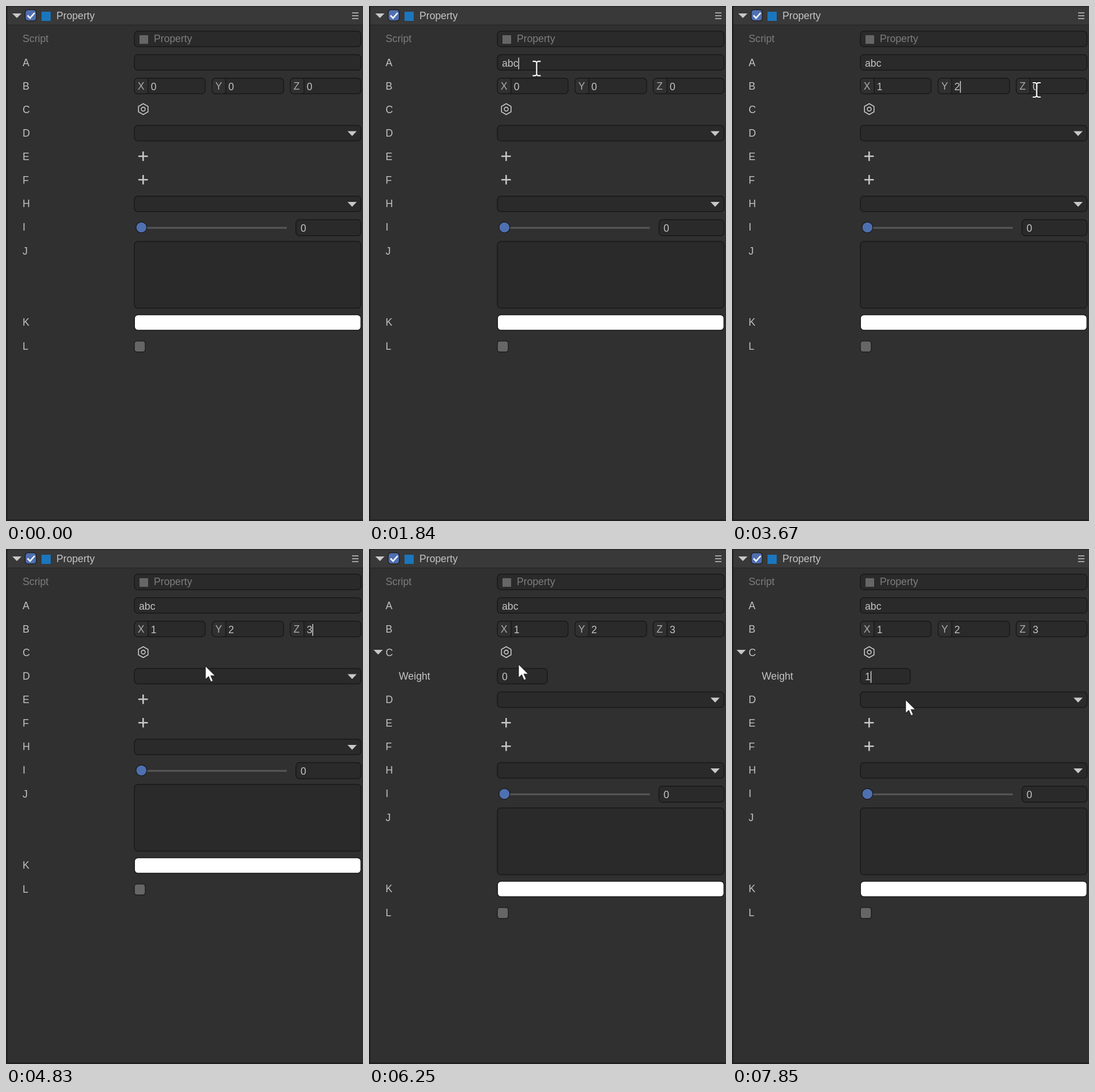
An HTML page that plays this animation: 623 px wide and 899 px high, repeating every 8 s.

```html
<!DOCTYPE html>
<html lang="en">
<head>
<meta charset="utf-8">
<title>Property panel</title>
<style>
html, body { margin: 0; width: 100%; height: 100%; overflow: hidden; background: #303030; }
svg { display: block; }
text { font: 17.7px "Liberation Sans", Arial, sans-serif; fill: #c4c4c4; white-space: pre; }
.dim { fill: #7d7d7d; }
.axis { fill: #aaa; }
.box { fill: #2a2a2a; stroke: #191919; stroke-width: 1.5; }
.icon { fill: #c8c8c8; }
.line { fill: none; stroke: #c8c8c8; }
#menu text { font: 17.7px "Noto Sans CJK SC", "Noto Sans CJK", sans-serif; fill: #111; }
#menu .off { fill: #777; }
</style>
</head>
<body>
<svg width="623" height="899" viewBox="0 0 623 899">
  <rect width="623" height="899" fill="#303030"/>
  <rect width="623" height="33" fill="#393939"/>
  <rect width="623" height="1.5" fill="#292929"/>
  <rect y="32.5" width="623" height="1.5" fill="#272727"/>
  <rect width="2.5" height="899" fill="#1e1e1e"/>
  <rect y="896.5" width="623" height="2.5" fill="#1f1f21"/>

  <path class="icon" d="M11 13H27L19 21Z"/>
  <rect x="33.5" y="6.5" width="19.5" height="19.5" rx="5" fill="#4f6fb0" stroke="#202020" stroke-width="1.5"/>
  <path d="M37.5 16.5L42 21L50 12" fill="none" stroke="#fff" stroke-width="2.6"/>
  <rect x="62" y="10" width="16" height="16" fill="#1b76bd"/>
  <text x="88" y="23.4">Property</text>
  <path class="line" stroke-width="1.7" d="M604 12H615M604 17H615M604 22H615"/>

  <g id="top"></g>
  <rect id="hover" x="224" y="164.5" width="31" height="31" rx="2" fill="#484848" stroke="#696969"/>
  <path class="line" stroke-width="1.6" d="M239.5 170.5L247.8 175.2V184.8L239.5 189.5L231.2 184.8V175.2Z"/>
  <circle class="line" cx="239.5" cy="180" r="3.4" stroke-width="1.6"/>
  <g id="weight"><path class="icon" d="M8 176H24L16 184.3Z"/></g>

  <g id="rest">
    <path class="line" stroke-width="2.6" d="M231 262.3H247.5M239.3 254V270.5M231 303.3H247.5M239.3 295V311.5"/>
    <path d="M246 387.3H490" stroke="#575757" stroke-width="3"/>
    <circle cx="236.3" cy="386.5" r="9.5" fill="#4f70b0" stroke="#1d1d1d" stroke-width="1.4"/>
    <rect x="224.3" y="539" width="395" height="27" rx="6" fill="#fff" stroke="#191919" stroke-width="1.3"/>
    <rect x="224" y="584.7" width="19" height="19.3" rx="4.5" fill="#666" stroke="#1d1d1d" stroke-width="1.4"/>
  </g>

  <g id="inputs"></g>
  <rect id="caret" width="1.4" height="20.5" fill="#ddd"/>

  <g id="menu">
    <rect x="236" y="178" width="153" height="81" fill="#000" opacity=".25"/>
    <rect x="234" y="175.5" width="153.5" height="81" fill="#fff" stroke="#ccc"/>
    <text x="270" y="206">创建实例</text>
    <text x="270" y="241.5" class="off">销毁实例</text>
  </g>

  <path id="arrow" d="M0 0V24L5.5 18.8L9.5 28L13.4 26.3L9.5 17.2H17Z" fill="#fff" stroke="#222" stroke-width="1.1"/>
  <g id="beam" fill="none">
    <path id="beamShape" d="M-7 -12.5H-2.5L0 -11L2.5 -12.5H7M0 -11V11M-7 12.5H-2.5L0 11L2.5 12.5H7" stroke="#1c1c1c" stroke-width="3.4"/>
    <use href="#beamShape"/>
    <path d="M-7 -12.5H-2.5L0 -11L2.5 -12.5H7M0 -11V11M-7 12.5H-2.5L0 11L2.5 12.5H7" stroke="#fff" stroke-width="2.2"/>
  </g>
  <circle id="press" r="17.5" fill="rgb(232,226,18)" fill-opacity=".56"/>
</svg>
<script>
const $ = id => document.getElementById(id);
const LOOP = 8000, PRESS = 200, BLINK = 530;
const MENU_OPEN = 5440, MENU_CLOSE = 6140;

function add(parent, tag, attrs, content = '') {
  const el = document.createElementNS('http://www.w3.org/2000/svg', tag);
  for (const name in attrs) el.setAttribute(name, attrs[name]);
  el.textContent = content;
  return $(parent).appendChild(el);
}
const label = (parent, x, y, content, cls = '') => add(parent, 'text', { x, y, class: cls }, content);
const box = (parent, x, y, width, height) =>
  add(parent, 'rect', { x, y, width, height, rx: 6, class: 'box' });
const show = (id, on) => $(id).setAttribute('visibility', on ? 'visible' : 'hidden');
const place = (id, x, y) => $(id).setAttribute('transform', `translate(${x} ${y})`);

// Upper rows
label('top', 29, 63.4, 'Script', 'dim');
box('top', 224, 44, 395.5, 27);
add('top', 'rect', { x: 233, y: 51, width: 15, height: 15, fill: '#666' });
label('top', 258, 63.4, 'Property', 'dim');
box('top', 224, 85, 395.5, 27);
['A', 'B', 'C'].forEach((name, i) => label('top', 29, 104.6 + 41 * i, name));
[['X', 224, 123.5], ['Y', 359.5, 125], ['Z', 496, 123.5]].forEach(([name, x, w]) => {
  box('top', x, 126, w, 27.3);
  add('top', 'rect', { x: x + 1, y: 127, width: 22.5, height: 25.3, rx: 5, fill: '#303030' });
  add('top', 'rect', { x: x + 23.3, y: 126.5, width: 1.4, height: 26.5, fill: '#191919' });
  label('top', x + 5.8, 146.2, name, 'axis');
});
label('weight', 52, 228, 'Weight');
box('weight', 224, 208.5, 87, 27);

// Lower rows, pushed down when C unfolds
[['D', 228], ['E', 269], ['F', 310], ['H', 351.3], ['I', 392.3], ['J', 433.5], ['K', 558.3], ['L', 599.5]]
  .forEach(([name, y]) => label('rest', 29, y, name));
[208.5, 332].forEach(y => {
  box('rest', 224, y, 395.5, 27);
  add('rest', 'path', { class: 'icon', d: `M596 ${y + 10}H612L604 ${y + 18.5}Z` });
});
box('rest', 506, 373, 113.5, 28);
label('rest', 514, 393.7, '0');
box('rest', 224, 411, 395.5, 116.5);

// Editable values: focus time, blur time, [time, text] entries
const inputs = [
  { x: 232, y: 106, text: '', focus: 940, blur: 2250, keys: [[1210, 'a'], [1410, 'ab'], [1630, 'abc']] },
  { x: 252.8, y: 147, text: '0', focus: 2250, blur: 3140, keys: [[2660, '1']] },
  { x: 388, y: 147, text: '0', focus: 3140, blur: 3820, keys: [[3420, '2']] },
  { x: 524.8, y: 147, text: '0', focus: 3820, blur: 5240, keys: [[4360, '3']] },
  { x: 232, y: 229.2, text: '0', focus: 6520, blur: LOOP, keys: [[7340, '1']] }
];
for (const f of inputs) {
  f.mark = add('inputs', 'rect', { x: f.x, y: f.y - 16.5, width: 9.8, height: 20.5, fill: '#0a5fcb' });
  f.el = label('inputs', f.x, f.y, '');
}

// Areas where the pointer becomes a text beam: left, top, right, bottom
const textAreas = [
  [224, 85, 619, 112], [248, 126, 347, 153], [384, 126, 484, 153], [520, 126, 619, 153],
  [506, 373, 619, 401], [224, 411, 619, 527]
];
const weightArea = [224, 208, 311, 235];
const hoverArea = [224, 164, 255, 196];
const inside = (x, y, [l, t, r, b]) => x >= l && x <= r && y >= t && y <= b;

const presses = [940, 2250, 3140, 3820, 5240, 5940, 6520];
const path = [
  [120, 604, 818], [810, 288.5, 104.5], [1750, 288.5, 104.5], [2220, 304.5, 136],
  [2720, 304.5, 136], [3110, 423, 145], [3420, 423, 145], [3800, 568, 145],
  [4290, 568, 145], [4830, 348, 204], [5040, 248, 186], [5220, 234, 175.5],
  [5480, 234, 175.5], [5740, 260, 216], [5900, 261, 201], [6270, 261, 201],
  [6500, 267.5, 220], [7080, 267.5, 220], [7840, 303, 263]
];

function pointerAt(t) {
  const i = path.findIndex(p => p[0] > t);
  if (i < 0) return path[path.length - 1].slice(1);
  if (!i) return path[0].slice(1);
  const [t0, x0, y0] = path[i - 1], [t1, x1, y1] = path[i];
  const u = (t - t0) / (t1 - t0), k = u * u * (3 - 2 * u);
  return [x0 + (x1 - x0) * k, y0 + (y1 - y0) * k];
}

function drawInputs(t, unfolded) {
  let caretOn = false;
  inputs.forEach((f, i) => {
    const typed = f.keys.filter(k => k[0] <= t).pop();
    const text = typed ? typed[1] : f.text;
    const focused = t >= f.focus && t < f.blur;
    const selected = focused && !typed && text !== '';
    const visible = i < 4 || unfolded;
    f.el.textContent = visible ? text : '';
    f.el.style.fill = selected ? '#fff' : '';
    f.mark.setAttribute('visibility', selected ? 'visible' : 'hidden');
    if (!focused || selected) return;
    const since = t - (typed ? typed[0] : f.focus);
    caretOn = since % (2 * BLINK) < BLINK;
    place('caret', f.x + (text ? f.el.getComputedTextLength() : 0), f.y - 16);
  });
  show('caret', caretOn);
}

function draw(t) {
  const unfolded = t >= MENU_CLOSE, menu = t >= MENU_OPEN && !unfolded;
  const [x, y] = pointerAt(t);
  const areas = unfolded ? [...textAreas, weightArea] : textAreas;
  const beam = !menu && areas.some(a => inside(x, y, a));

  show('menu', menu);
  show('hover', menu || (t >= 120 && inside(x, y, hoverArea)));
  show('weight', unfolded);
  place('rest', 0, unfolded ? 41 : 0);
  drawInputs(t, unfolded);

  show('arrow', t >= 120 && !beam);
  show('beam', t >= 120 && beam);
  place('arrow', x, y);
  place('beam', x + 2.5, y + 1.5);
  show('press', presses.some(p => t >= p && t < p + PRESS));
  place('press', x, y);
}

const start = performance.now();
function tick() {
  draw((performance.now() - start) % LOOP);
  requestAnimationFrame(tick);
}
tick();
</script>
</body>
</html>
```
